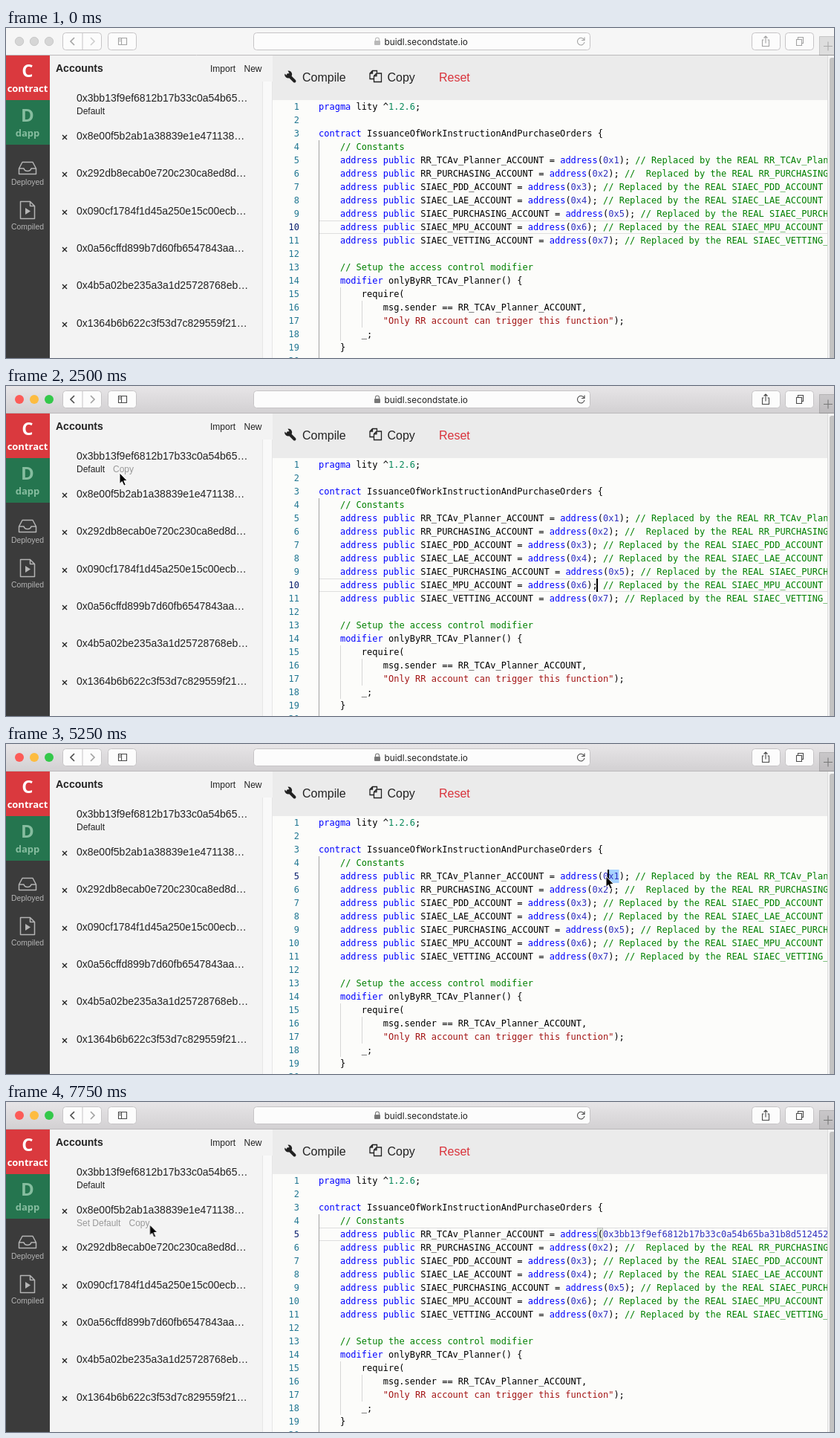
These frames come from a looping animation (1115 px wide and 444 px high, 8000 ms). An HTML page:

```html
<!DOCTYPE html>
<html lang="en">
<head>
<meta charset="utf-8">
<title>Contract editor</title>
<style>
html, body { margin: 0; width: 100%; height: 100%; overflow: hidden; background: #fcfcfa; }
svg { display: block; width: 1115px; height: 444px; }
text { white-space: pre; font-family: "Liberation Sans", Arial, sans-serif; fill: #222; }
.mono text { font: 12px "DejaVu Sans Mono", monospace; fill: #000; }
.mono .num { fill: #237893; text-anchor: end; }
.mono .now { fill: #0b216f; }
.key { fill: #0000ff; }
.note { fill: #008000; }
.str { fill: #a31515; }
.hex { fill: #3030c0; }
.ver { fill: #09885a; }
.mid { text-anchor: middle; }
.logo text { font-family: "Noto Sans", sans-serif; font-weight: 700; text-anchor: middle; }
.line { fill: none; stroke: #4a4a4a; stroke-width: 1.1; }
.btn { fill: #fcfcfc; stroke: #c6c4c6; stroke-width: 1; }
.side { fill: none; stroke: #b4b4b4; stroke-width: 1.5; stroke-linejoin: round; }
.tool { font-size: 16px; }
.small { font-size: 12px; }
.gray { fill: #999; }
.match { fill: #e3ede1; stroke: #b9b9b9; }
.active { fill: none; stroke: #dedede; }
</style>
</head>
<body>
<svg viewBox="0 0 1115 444">
  <defs>
    <linearGradient id="bar" x2="0" y2="1">
      <stop stop-color="#e7e5e7"/><stop offset="1" stop-color="#d2d0d2"/>
    </linearGradient>
    <clipPath id="pane"><rect x="359" y="97" width="746.5" height="347"/></clipPath>
  </defs>

  <!-- browser bar -->
  <rect width="1115" height="37" fill="#f6f6f6"/>
  <rect id="barOn" width="1115" height="37" fill="url(#bar)"/>
  <path d="M0 36.5H1115" stroke="#bcbabc"/>
  <g id="lightsOff" fill="#d6d6d6" stroke="#c2c2c2" stroke-width=".8">
    <circle cx="18" cy="18" r="5.7"/><circle cx="38" cy="18" r="5.7"/><circle cx="58" cy="18" r="5.7"/>
  </g>
  <g id="lightsOn">
    <circle cx="18" cy="18" r="6" fill="#fc5b57"/><circle cx="38" cy="18" r="6" fill="#fdbc40"/><circle cx="58" cy="18" r="6" fill="#34c84a"/>
  </g>
  <g class="btn">
    <rect x="76.5" y="6.5" width="52" height="23" rx="4"/>
    <path d="M103 7V29"/>
    <rect x="137.5" y="6.5" width="38" height="23" rx="4"/>
    <rect x="333.5" y="6.5" width="453" height="23" rx="4"/>
    <rect x="1004.5" y="6.5" width="38" height="23" rx="4"/>
    <rect x="1049.5" y="6.5" width="38" height="23" rx="4"/>
  </g>
  <rect x="1095.5" y="11.5" width="21" height="25" fill="#000" fill-opacity=".1" stroke="#000" stroke-opacity=".15"/>
  <g id="icons" class="line">
    <path d="M92 13L87 18L92 23" stroke-width="1.6"/>
    <path d="M114 13L119 18L114 23" stroke="#a0a0a0" stroke-width="1.6"/>
    <path d="M151.500 13.500H162.500V22.500H151.500ZM155.500 13.500V22.500M152.500 15.500H154.500M152.500 17.500H154.500"/>
    <path d="M1020.500 16H1018.500V24.500H1027.500V16H1025.500M1023 20.500V11.500M1020.500 13.500L1023 11L1025.500 13.500"/>
    <path d="M1064.500 15.500H1071.500V23.500H1064.500ZM1066.500 15.500V12.500H1073.500V20.500H1071.500"/>
    <path d="M1101 24.500H1113M1107 18.500V30.500" stroke="#777"/>
    <path d="M778.800 16.500A4.800 4.800 0 1 0 779 19M775 16.500H779V12.500"/>
    <path d="M497.500 17V15.500A2.500 2.500 0 0 1 502.500 15.500V17" stroke="#777"/>
    <rect x="496" y="17" width="8" height="6" rx="1" fill="#777" stroke="none"/>
  </g>
  <text x="509.500" y="22.500" style="font:11.800px Inter,sans-serif">buidl.secondstate.io</text>

  <!-- left rail -->
  <rect y="37" width="59" height="407" fill="#3b3b3b"/>
  <rect y="37" width="59" height="60" fill="#da393e"/>
  <rect y="97" width="59" height="60" fill="#25754f"/>
  <g class="logo" style="--c:#fff">
    <text x="29" y="66" font-size="24" style="fill:#fff">C</text>
    <text x="29" y="86" font-size="13" style="fill:#fff">contract</text>
    <text x="29" y="126" font-size="24" style="fill:#86bd9f">D</text>
    <text x="29" y="146" font-size="13" style="fill:#86bd9f">dapp</text>
  </g>
  <g class="side">
    <path d="M17.500 189L22 180.500H36L40.500 189V196.500H17.500ZM17.500 189H24Q25 192.500 29 192.500T34 189H40.500"/>
    <path d="M19.500 233.500H32.500L38.500 239.500V256.500H19.500ZM32.500 233.500V239.500H38.500"/>
    <path d="M26 242V251L33 246.500Z" fill="#b4b4b4" stroke="none"/>
  </g>
  <g class="mid" font-size="10.400">
    <text x="29" y="211" style="fill:#b4b4b4">Deployed</text>
    <text x="29" y="271" style="fill:#b4b4b4">Compiled</text>
  </g>

  <!-- accounts -->
  <rect x="59" y="37" width="300" height="407" fill="#f3f3f3"/>
  <rect x="345" y="72" width="14" height="372" fill="#f9f9f9"/>
  <path d="M345.500 72V444M358.500 72V444" stroke="#e6e6e6"/>
  <text x="67" y="59" font-size="14" font-weight="700">Accounts</text>
  <text class="small" x="275" y="59">Import</text>
  <text class="small" x="320.500" y="59">New</text>
  <g id="accounts"></g>
  <text class="small" x="95" y="116">Default</text>
  <text class="small gray" id="copy" x="144" y="116">Copy</text>
  <text class="small gray" id="copied" x="144" y="116">Copied</text>
  <g id="second">
    <text class="small gray" x="95" y="167">Set Default</text>
    <text class="small gray" x="165.500" y="167">Copy</text>
  </g>

  <!-- toolbar -->
  <rect x="359" y="37" width="756" height="60" fill="#ebebeb"/>
  <path d="M380 63L388.500 71.500" stroke="#222" stroke-width="4" stroke-linecap="round"/>
  <path d="M379.500 57.500A5 5 0 1 1 375.300 61.500L378.500 64L381.500 61Z" fill="#222"/>
  <g class="line" style="stroke:#222;stroke-width:1.300">
    <path d="M495 68.500H490V61L493.500 57.500H499.500V60M493.500 57.500V61H490"/>
    <path d="M495.500 64.500L499 61H505.500V72.500H495.500ZM499 61V64.500H495.500"/>
  </g>
  <text class="tool" x="399" y="72">Compile</text>
  <text class="tool" x="513.500" y="72">Copy</text>
  <text class="tool" x="583" y="72" style="fill:#d9333b">Reset</text>

  <!-- editor -->
  <rect x="359" y="97" width="756" height="347" fill="#fcfcfa"/>
  <g class="mono" clip-path="url(#pane)">
    <rect class="active" id="line10" x="421.500" y="259.500" width="690" height="17"/>
    <rect class="active" id="line5" x="421.500" y="169.500" width="690" height="17"/>
    <rect id="pick" y="169" height="18" fill="#a6d2ff"/>
    <rect class="match" id="open" x="796.500" y="169.500" width="7" height="17"/>
    <rect class="match" id="close" x="825.500" y="169.500" width="7" height="17"/>
    <path d="M421.500 151V444" stroke="#a2a2a2"/>
    <path d="M450.500 349V421M479.500 367V403" stroke="#d6d6d6"/>
    <g id="code"></g>
    <rect id="caret" width="2" height="18"/>
  </g>
  <rect x="1106" y="37" width="9" height="407" fill="#f4f4f4"/>
  <path d="M1106.500 37V444" stroke="#dcdcdc"/>
  <rect x="1109" y="40" width="8" height="420" rx="3" fill="#c2c2c2"/>

  <path id="mouse" d="M0 0V14.500L3.300 11.500L5.800 17.200L8.300 16.100L5.800 10.600H10.300Z" fill="#000" stroke="#fff" stroke-width="1"/>
</svg>
<script>
const LOOP = 8000, CHAR = 7.224, LEFT = 421;
const $ = id => document.getElementById(id);

function add(parent, tag, attrs, text) {
  const el = document.createElementNS('http://www.w3.org/2000/svg', tag);
  for (const k in attrs) el.setAttribute(k, attrs[k]);
  if (text) el.textContent = text;
  return parent.appendChild(el);
}

// Account list
[
  '0x3bb13f9ef6812b17b33c0a54b65', '0x8e00f5b2ab1a38839e1e471138', '0x292db8ecab0e720c230ca8ed8d',
  '0x090cf1784f1d45a250e15c00ecb', '0x0a56cffd899b7d60fb6547843aa', '0x4b5a02be235a3a1d25728768eb',
  '0x1364b6b622c3f53d7c829559f21'
].forEach((id, i) => {
  const y = Math.round(99.4 + 50.4 * i);
  add($('accounts'), 'text', { x: 95, y, 'font-size': 14 }, id + '…');
  if (i) add($('accounts'), 'path', { d: `M76 ${y - 6}l6 6m0 -6l-6 6`, stroke: '#222', 'stroke-width': 1.4 });
});

// Code with a small highlighter
const TOKEN = /(\/\/.*)|(".*?")|(0x[0-9a-f]+)|(\d+\.\d+\.\d+)|\b(pragma|contract|address|public|modifier)\b/g;
const KINDS = ['note', 'str', 'hex', 'ver', 'key'];

function codeLine(source, row) {
  const text = add($('code'), 'text', { x: LEFT, y: 92 + 18 * row });
  let end = 0;
  for (const m of source.matchAll(TOKEN)) {
    add(text, 'tspan', {}, source.slice(end, m.index));
    add(text, 'tspan', { class: KINDS[m.slice(1).findIndex(Boolean)] }, m[0]);
    end = m.index + m[0].length;
  }
  add(text, 'tspan', {}, source.slice(end));
  return text;
}

const account = (name, value, gap = ' ') =>
  `    address public ${name}_ACCOUNT = address(${value}); //${gap}Replaced by the REAL ${name}_ACCOUNT`;

const rows = [
  'pragma lity ^1.2.6;',
  '',
  'contract IssuanceOfWorkInstructionAndPurchaseOrders {',
  '    // Constants',
  account('RR_TCAv_Planner', '0x1'),
  account('RR_PURCHASING', '0x2', '  '),
  account('SIAEC_PDD', '0x3'),
  account('SIAEC_LAE', '0x4'),
  account('SIAEC_PURCHASING', '0x5'),
  account('SIAEC_MPU', '0x6'),
  account('SIAEC_VETTING', '0x7'),
  '',
  '    // Setup the access control modifier',
  '    modifier onlyByRR_TCAv_Planner() {',
  '        require(',
  '            msg.sender == RR_TCAv_Planner_ACCOUNT,',
  '            "Only RR account can trigger this function");',
  '        _;',
  '    }',
  ''
].map((source, i) => {
  add($('code'), 'text', { class: 'num', id: 'n' + (i + 1), x: 395, y: 110 + 18 * i }, String(i + 1));
  return codeLine(source, i + 1);
});
const pasted = codeLine(account('RR_TCAv_Planner', '0x3bb13f9ef6812b17b33c0a54b65ba31b8d512452'), 5);

// Motion: each value holds until the next step
function hold(el, prop, steps) {
  const frames = steps.map(([t, v]) => ({ offset: t / LOOP, [prop]: v, easing: 'steps(1)' }));
  frames.push({ offset: 1, [prop]: steps.at(-1)[1] });
  el.animate(frames, { duration: LOOP, iterations: Infinity });
}

// Opacity starts at `first` and flips at each time
const flip = (el, first, ...times) =>
  hold(el, 'opacity', [0, ...times].map((t, i) => [t, i % 2 ? 1 - first : first]));

const move = (el, steps) =>
  hold(el, 'transform', steps.map(([t, x, y]) => [t, `translate(${x}px, ${y}px)`]));

const FOCUS = 1250, CLICK = 4750, PASTE = 6750;

flip($('barOn'), 0, FOCUS);
flip($('lightsOn'), 0, FOCUS);
flip($('lightsOff'), 1, FOCUS);
hold($('icons'), 'opacity', [[0, 0.5], [FOCUS, 1]]);

flip($('copy'), 0, 1500, 3000);
flip($('copied'), 0, 3000, 3500);
flip($('second'), 0, 7500);

flip($('line10'), 1, CLICK);
flip($('line5'), 0, CLICK, 5000, PASTE);
flip($('open'), 0, CLICK, 5000, PASTE);
flip($('close'), 0, CLICK, 5000);
hold($('n10'), 'fill', [[0, '#0b216f'], [CLICK, '#237893']]);
hold($('n5'), 'fill', [[0, '#237893'], [CLICK, '#0b216f']]);
flip(rows[4], 1, PASTE);
flip(pasted, 0, PASTE);

const col = n => LEFT + n * CHAR;
const drag = [[CLICK, 56], [5000, 55], [5250, 54], [5500, 53]];
hold($('pick'), 'x', [[0, col(56) + 'px'], ...drag.map(([t, n]) => [t, col(n) + 'px'])]);
hold($('pick'), 'width', [[0, '0px'], ...drag.map(([t, n]) => [t, (56 - n) * CHAR + 'px']), [PASTE, '0px']]);

move($('caret'), [[0, 795, 259], ...drag.map(([t, n]) => [t, col(n) - 1, 169])]);
flip($('caret'), 0, FOCUS, 1750, 2250, 2750, CLICK, 6000, 6500, PASTE);

flip($('mouse'), 0, 500);
move($('mouse'), [
  [0, 600, 130], [500, 600, 130], [750, 380, 50], [1000, 276, 17],
  [1500, 196, 94], [1750, 168, 109], [2000, 153, 117],
  [3500, 407, 112], [3750, 760, 344], [4000, 813, 130], [4250, 818.5, 182],
  [5000, 815, 180], [5250, 808, 178], [5500, 796, 181],
  [6000, 837, 174], [7000, 640, 220], [7250, 383, 200], [7500, 226, 142], [7750, 193.5, 165]
]);
</script>
</body>
</html>
```
